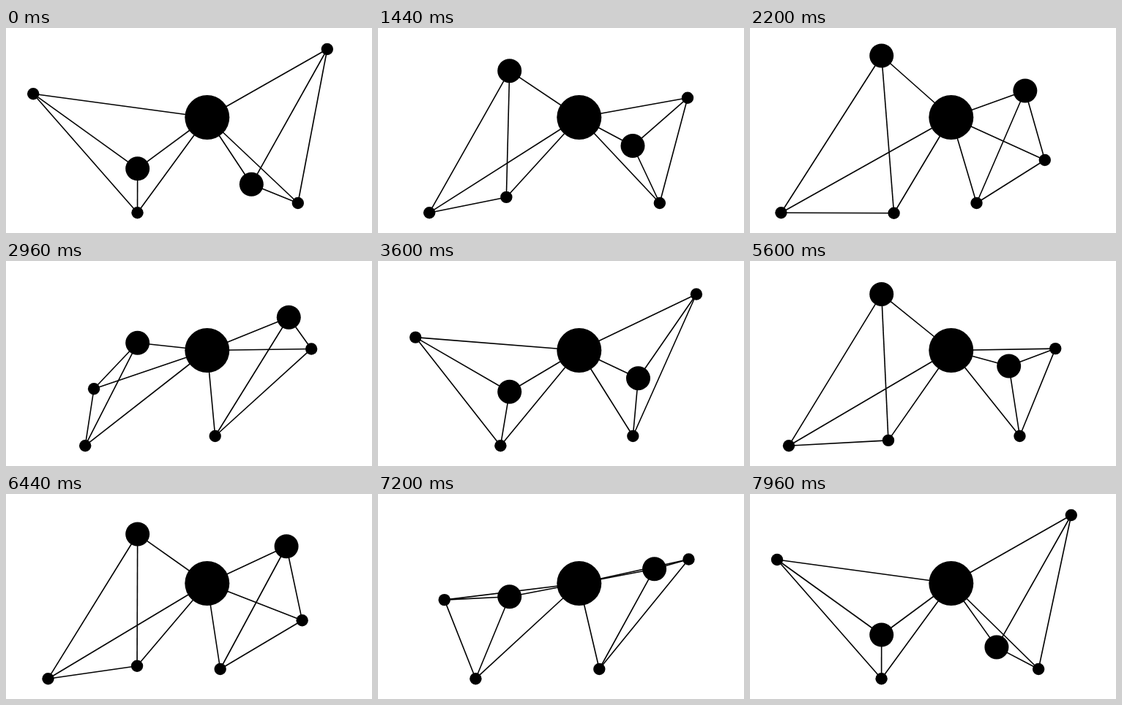
Write an HTML page that moves like this. It is 500 px wide and 281 px high and loops after 8000 ms.

```html
<!DOCTYPE html>
<html lang="en">
<head>
<meta charset="utf-8">
<title>Swinging network</title>
<style>
  html, body { margin: 0; width: 100%; height: 100%; overflow: hidden; background: #fff; }
  svg { display: block; width: 100vw; height: 100vh; }
  line { stroke: #000; stroke-width: 1.6; }
</style>
</head>
<body>
<svg id="stage" viewBox="0 0 500 281"></svg>
<script>
const STEP = 40;     // ms per picture
const CYCLE = 100;   // pictures per swing
const SOFT = [1 / 3, 2 / 3];

// A track swings from one value to another and back.
// start/peak/end are in pictures; out/back hold the ease handles.
const swing = (from, to, start, peak, end, out = SOFT, back = SOFT) =>
  ({ from, to, start, peak, end, out, back });
const fixed = v => swing(v, v, 0, 50, 100);
const late = [0.59, 0.71];

const nodes = {
  hub: { r: 30.5, x: fixed(274.8), y: fixed(122.5) },
  a: { r: 8.2, x: swing(37, 203.2, 0, 50, 100), y: swing(90, 260.5, 0, 50, 100) },
  b: { r: 16.5, x: fixed(179.7), y: swing(193, 31.6, 0, 50, 100) },
  c: { r: 8.2, x: swing(179.6, 36.8, 0, 50, 100, [0.57, 0.68]), y: fixed(253.2) },
  d: { r: 8.2, x: swing(438.8, 402.8, 11, 56, 100, late), y: swing(29, 181, 11, 56, 100, late) },
  e: {
    r: 16.5,
    x: swing(327.5, 388.2, 10.5, 71, 110.5, [0.4, 0.735], [0.315, 0.633]),
    y: swing(236, 66, 10.4, 68.4, 110.4)
  },
  f: { r: 8.2, x: swing(437, 282, 15.4, 70.9, 115.4), y: fixed(240) }
};
const groups = [['hub', 'a', 'b', 'c'], ['hub', 'd', 'e', 'f']];

// Cubic ease with level ends; the handles set how long it lingers.
function ease(u, [x1, x2]) {
  let lo = 0, hi = 1;
  for (let i = 0; i < 24; i++) {
    const s = (lo + hi) / 2, r = 1 - s;
    if (3 * r * r * s * x1 + 3 * r * s * s * x2 + s * s * s < u) lo = s;
    else hi = s;
  }
  return lo * lo * (3 - 2 * lo);
}

function valueAt(k, pos) {
  if (pos < k.end - CYCLE) pos += CYCLE;
  let p = 0;
  if (pos > k.start && pos <= k.peak) {
    p = ease((pos - k.start) / (k.peak - k.start), k.out);
  } else if (pos > k.peak && pos < k.end) {
    p = 1 - ease((pos - k.peak) / (k.end - k.peak), k.back);
  }
  return k.from + (k.to - k.from) * p;
}

const stage = document.getElementById('stage');
function add(tag) {
  return stage.appendChild(document.createElementNS('http://www.w3.org/2000/svg', tag));
}
function setAll(el, attrs) {
  for (const name in attrs) el.setAttribute(name, attrs[name]);
}

const links = [];
for (const g of groups) {
  g.forEach((from, i) => g.slice(i + 1).forEach(to => links.push({ from, to, el: add('line') })));
}
for (const n of Object.values(nodes)) {
  n.el = add('circle');
  setAll(n.el, { r: n.r });
}

function draw(ms) {
  const pos = (Math.floor(ms / STEP) + 1) % CYCLE;
  for (const n of Object.values(nodes)) {
    n.cx = valueAt(n.x, pos);
    n.cy = valueAt(n.y, pos);
    setAll(n.el, { cx: n.cx, cy: n.cy });
  }
  for (const { from, to, el } of links) {
    const p = nodes[from], q = nodes[to];
    setAll(el, { x1: p.cx, y1: p.cy, x2: q.cx, y2: q.cy });
  }
}

const begin = performance.now();
function tick() {
  draw(performance.now() - begin);
  requestAnimationFrame(tick);
}
tick();
</script>
</body>
</html>
```
